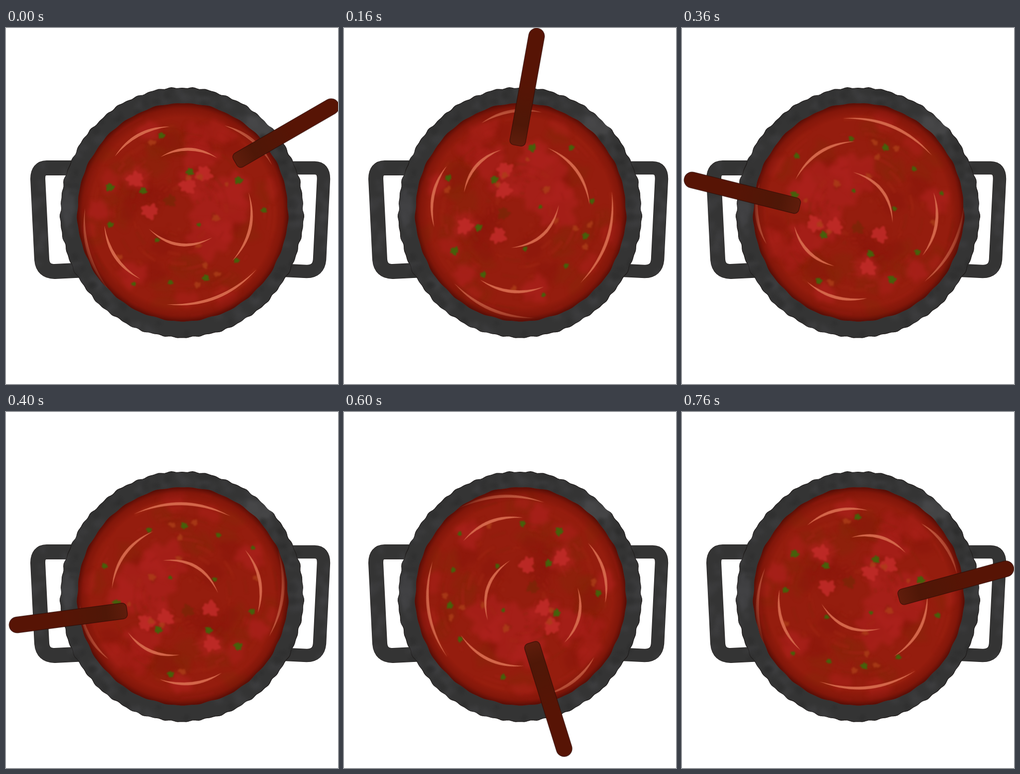
Animation, 668 px wide and 715 px high, one loop 800 ms. Source, as an HTML page with a canvas:

```html
<!DOCTYPE html>
<html lang="en">
<head>
<meta charset="utf-8">
<title>Stirred soup</title>
<style>
html, body { margin: 0; width: 100%; height: 100%; overflow: hidden; background: #fff; }
canvas { display: block; }
</style>
</head>
<body>
<canvas id="stage" width="668" height="715"></canvas>
<script>
const W = 668, H = 715, LOOP = 800, STEP = 40;
const CX = 353, CY = 369.5;
const TAU = Math.PI * 2, RAD = Math.PI / 180;

let seed = 11;
function rnd(a = 0, b = 1) {
  seed = (seed * 16807) % 2147483647;
  return a + (b - a) * seed / 2147483647;
}

function layer() {
  const c = document.createElement('canvas');
  c.width = W;
  c.height = H;
  return c.getContext('2d');
}

// Turn of the soup: [time, degrees], joined by a smooth curve
const TURN = [[0, 0], [160, 49.8], [280, 96], [400, 157.5], [480, 201], [600, 257.4], [760, 345.2], [800, 360]];
function spin(t) {
  const last = TURN.length - 1;
  const span = i => TURN[i + 1][0] - TURN[i][0];
  const rate = i => (TURN[i + 1][1] - TURN[i][1]) / span(i);
  const slope = i => {
    const a = (i + last - 1) % last, b = i % last;
    return (span(b) * rate(a) + span(a) * rate(b)) / (span(a) + span(b));
  };
  let i = 0;
  while (i < last - 1 && t >= TURN[i + 1][0]) i++;
  const h = span(i), s = (t - TURN[i][0]) / h, q = 1 - s;
  return -(q * q * (1 + 2 * s) * TURN[i][1] + s * s * (3 - 2 * s) * TURN[i + 1][1]
    + s * q * h * (q * slope(i) - s * slope(i + 1)));
}

// Closed ellipse with an uneven edge
function wobble(g, x, y, rx, ry, amp, waves, phase = 0) {
  g.beginPath();
  for (let i = 0; i < 360; i++) {
    const a = i * RAD;
    const k = amp * waves.reduce((sum, n, j) => sum + Math.sin(n * a + phase * (j + 1)), 0);
    g.lineTo(x + Math.cos(a) * (rx + k), y + Math.sin(a) * (ry + k));
  }
  g.closePath();
}

function patch(g, color, x, y, rx, ry, alpha = 1) {
  g.globalAlpha = alpha;
  g.fillStyle = color;
  wobble(g, x, y, rx, ry, Math.min(rx, ry) * 0.13, [3, 5, 8], x + y);
  g.fill();
  g.globalAlpha = 1;
}

// Random patches between two radii
function scatter(g, n, color, r0, r1, size, alpha) {
  for (let i = 0; i < n; i++) {
    const a = rnd(0, TAU), r = rnd(r0, r1);
    patch(g, color, CX + Math.cos(a) * r, CY + Math.sin(a) * r,
      size * rnd(0.5, 1.2), size * rnd(0.5, 1), alpha);
  }
}

function handle(g, width) {
  const p = new Path2D('M160 281 H82 Q64 281 64 303 L72 465 Q74 489 98 489 L160 486');
  g.strokeStyle = '#1d1918';
  g.lineWidth = width + 1.5;
  g.stroke(p);
  g.strokeStyle = '#343434';
  g.lineWidth = width;
  g.stroke(p);
}

function makePot() {
  const g = layer();
  handle(g, 28.5);
  g.save();
  g.translate(703, 0);
  g.scale(-1, 1);
  handle(g, 25);
  g.restore();

  wobble(g, 354, 370.5, 244, 250.5, 0.7, [17, 41, 67]);
  g.fillStyle = '#343434';
  g.fill();
  g.lineWidth = 1.3;
  g.strokeStyle = '#1d1918';
  g.stroke();

  g.globalCompositeOperation = 'source-atop';
  g.filter = 'blur(3px)';
  scatter(g, 70, '#414243', 218, 250, 11, 0.4);
  scatter(g, 60, '#282828', 218, 250, 10, 0.4);
  for (let i = 0; i < 30; i++)
    patch(g, '#414243', i % 2 ? rnd(52, 76) : rnd(628, 648), rnd(275, 500), rnd(4, 9), rnd(5, 12), 0.4);
  patch(g, '#4a4b4c', 508, 198, 30, 20, 0.7);
  patch(g, '#46474a', 124, 362, 13, 38, 0.6);
  return g.canvas;
}

// Tapered stroke bowed away from the centre
function glint(g, x0, y0, x1, y1) {
  const mx = (x0 + x1) / 2, my = (y0 + y1) / 2;
  const r = Math.hypot(mx - CX, my - CY), len = Math.hypot(x1 - x0, y1 - y0);
  const bow = 2 * len * (0.2 - r / 2000);
  let nx = (y1 - y0) / len, ny = (x0 - x1) / len;
  if (nx * (mx - CX) + ny * (my - CY) < 0) {
    nx = -nx;
    ny = -ny;
  }
  g.beginPath();
  g.moveTo(x0, y0);
  g.quadraticCurveTo(mx + nx * (bow + 6), my + ny * (bow + 6), x1, y1);
  g.quadraticCurveTo(mx + nx * (bow - 6), my + ny * (bow - 6), x0, y0);
  g.fill();
}

const LIGHT = [[430, 365, 58], [410, 422, 44], [455, 322, 36], [390, 258, 34], [378, 310, 32],
  [262, 302, 26], [255, 495, 28], [186, 367, 23], [288, 207, 22]];
const BRIGHT = [[260, 304], [366, 317], [398, 293], [289, 368]];
const HERBS = [[209, 320], [468, 306], [370, 289], [276, 327], [402, 502], [313, 216], [210, 395],
  [519, 366], [464, 467], [331, 511], [304, 426], [257, 514], [388, 395]];
const GLINTS = [[219, 258, 329, 198], [311, 259, 425, 261], [440, 196, 535, 275], [488, 330, 455, 468],
  [287, 403, 415, 421], [198, 397, 270, 504], [159, 362, 210, 530], [323, 555, 504, 485]];

function makeSoup() {
  const g = layer();
  g.fillStyle = '#951d0e';
  g.fillRect(0, 0, W, H);

  g.filter = 'blur(4px)';
  scatter(g, 24, '#87270a', 100, 205, 26, 0.45);
  scatter(g, 14, '#8a170b', 40, 200, 28, 0.55);
  for (const [x, y, r] of LIGHT) patch(g, '#ad221d', x, y, r, r * 0.85, 0.7);
  scatter(g, 9, '#a8211a', 120, 200, 24, 0.6);

  // Brushed streaks around the centre
  const tints = ['#aa231a', '#85250a', '#8e190c', '#a52b14'];
  g.filter = 'blur(1.5px)';
  for (let i = 0; i < 130; i++) {
    const a = rnd(0, TAU);
    g.globalAlpha = rnd(0.12, 0.32);
    g.strokeStyle = tints[i % 4];
    g.lineWidth = rnd(3, 9);
    g.beginPath();
    g.arc(CX, CY, rnd(30, 212), a, a + rnd(0.06, 0.4));
    g.stroke();
  }
  for (const [x, y] of BRIGHT) patch(g, '#bf2b27', x, y, 16, 14, 0.9);
  scatter(g, 10, '#ab3d18', 70, 165, 7, 0.8);
  patch(g, '#7b2606', 330, 347, 12, 11, 0.8);

  g.filter = 'blur(1px)';
  HERBS.forEach(([x, y], i) => patch(g, '#46600b', x, y, 8.2 - i * 0.33, 7.4 - i * 0.33));

  g.filter = 'blur(0.5px)';
  g.fillStyle = '#d4664a';
  for (const p of GLINTS) glint(g, ...p);
  return g.canvas;
}

function makeRim() {
  const g = layer();
  g.translate(355.5, 370);
  g.scale(213, 220);
  const shade = g.createRadialGradient(0, 0, 0.87, 0, 0, 1.01);
  shade.addColorStop(0, 'rgba(100,14,4,0)');
  shade.addColorStop(0.55, 'rgba(104,14,4,.4)');
  shade.addColorStop(1, 'rgba(66,10,5,.95)');
  g.fillStyle = shade;
  g.fillRect(-1.1, -1.1, 2.2, 2.2);
  return g.canvas;
}

const pot = makePot(), soup = makeSoup(), rim = makeRim();
const ctx = document.getElementById('stage').getContext('2d');

// The tip spirals inwards and trails the soup; the stick turns with it
function drawSpoon(t) {
  const u = t / 760;
  const r = 157 - 64 * u;
  const a = (spin(t) - 42 + 28 * u ** 2.6) * RAD;
  ctx.save();
  ctx.translate(CX + r * Math.cos(a), CY + r * Math.sin(a));
  ctx.rotate((spin(t) - 30) * RAD);
  ctx.beginPath();
  ctx.roundRect(-10, -16, 239, 32, [9, 16, 16, 9]);
  const wood = ctx.createLinearGradient(-10, 0, 130, 0);
  wood.addColorStop(0, '#601d0c');
  wood.addColorStop(0.3, '#4f1707');
  wood.addColorStop(1, '#571405');
  ctx.fillStyle = wood;
  ctx.fill();
  ctx.lineWidth = 1.4;
  ctx.strokeStyle = 'rgba(45,12,6,.65)';
  ctx.stroke();
  ctx.restore();
}

function draw(t) {
  ctx.fillStyle = '#fff';
  ctx.fillRect(0, 0, W, H);
  ctx.drawImage(pot, 0, 0);
  ctx.save();
  wobble(ctx, 355.5, 370, 212, 219, 0.5, [13, 23, 37]);
  ctx.clip();
  ctx.save();
  ctx.translate(CX, CY);
  ctx.rotate(spin(t) * RAD);
  ctx.drawImage(soup, -CX, -CY);
  ctx.restore();
  ctx.drawImage(rim, 0, 0);
  ctx.restore();
  drawSpoon(t);
}

const start = performance.now();
function tick() {
  const step = Math.floor((performance.now() - start) / STEP + 0.01);
  draw(step * STEP % LOOP);
  requestAnimationFrame(tick);
}
tick();
</script>
</body>
</html>
```
